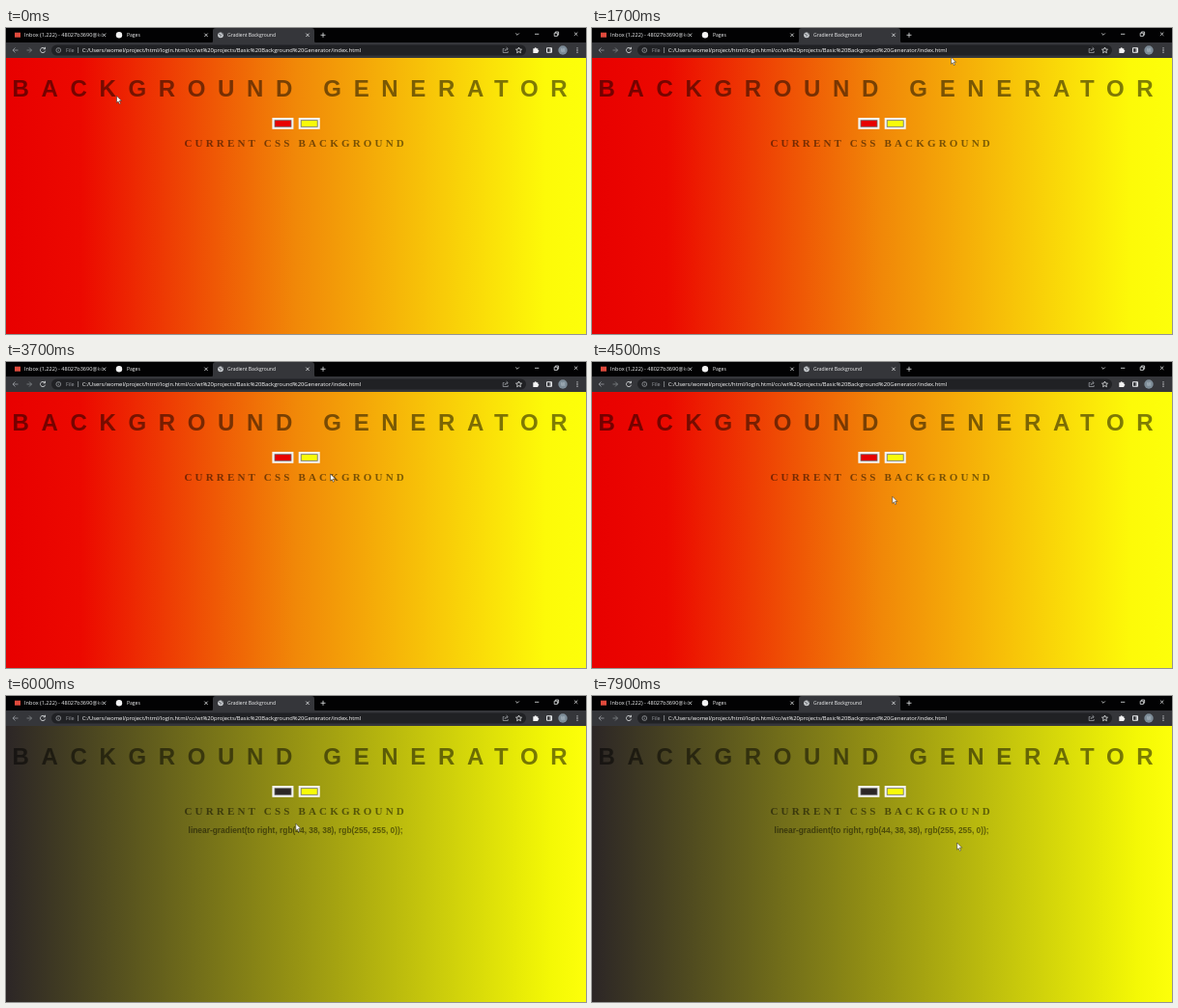
An HTML page that plays this animation: 600 by 317 pixels, repeating every 8000 ms.

```html
<!DOCTYPE html>
<html lang="en">
<head>
<meta charset="utf-8">
<title>Background generator</title>
<style>
  html, body { margin: 0; width: 100%; height: 100%; overflow: hidden; background: #000; }
  svg { display: block; width: 100%; height: 100%; }
  .ui { font-family: "Open Sans", "Noto Sans", sans-serif; font-size: 5.05px; fill: #f4f5f6; }
  .url { font-size: 5.83px; fill: #fff; }
  .dim { fill: #9a9da2; }
  .icon { fill: none; stroke: #e4e6e8; stroke-width: .8; }
  .page { fill: #000; fill-opacity: .5; font-weight: bold; }
  .title { font: bold 24px "Liberation Sans", Arial, sans-serif; letter-spacing: 12.65px; }
  .heading { font: bold 11px "Liberation Serif", "Times New Roman", serif; letter-spacing: 3.18px; }
  .css { font: bold 8.4px "Liberation Sans", Arial, sans-serif; }
</style>
</head>
<body>
<svg viewBox="0 0 600 317" preserveAspectRatio="none">
  <defs>
    <linearGradient id="warm">
      <stop offset="0" stop-color="#e80000"/>
      <stop offset=".13" stop-color="#ec0900"/>
      <stop offset=".5" stop-color="#f18808"/>
      <stop offset=".93" stop-color="#fdfa08"/>
      <stop offset="1" stop-color="#fdff0a"/>
    </linearGradient>
    <linearGradient id="dark">
      <stop offset="0" stop-color="#2c2626"/>
      <stop offset=".5" stop-color="#969313"/>
      <stop offset=".94" stop-color="#f4f805"/>
      <stop offset="1" stop-color="#fdff0a"/>
    </linearGradient>
    <linearGradient id="fade" gradientUnits="userSpaceOnUse" x1="92" x2="103" y1="0" y2="0">
      <stop offset="0" stop-color="#f4f5f6"/>
      <stop offset="1" stop-color="#f4f5f6" stop-opacity="0"/>
    </linearGradient>
    <path id="x" d="M-1.7-1.7l3.4 3.4M1.7-1.7l-3.4 3.4"/>
  </defs>

  <rect id="backdrop" y="31" width="600" height="286"/>

  <!-- tab strip -->
  <rect width="600" height="16" fill="#020203"/>
  <path d="M211 16q3 0 3-3V3q0-3 3-3h99q3 0 3 3v10q0 3 3 3z" fill="#35363a"/>
  <rect x="9" y="4.7" width="6" height="5" fill="#e04a3c"/>
  <circle cx="117" cy="7.3" r="3.2" fill="#f4f4f4"/>
  <circle cx="222" cy="7.3" r="2.9" fill="#c9ccd0"/>
  <path d="M220 6l2 1v2M223 5l1.2 1.5-1 1" stroke="#55585c" stroke-width=".8" fill="none"/>
  <g class="ui">
    <text x="19" y="9.3" style="font-size:5.6px;fill:url(#fade)">Inbox (1,222) - 48027b3690@ke</text>
    <text x="125" y="9.2">Pages</text>
    <text x="229" y="9.2">Gradient Background</text>
  </g>
  <g class="icon">
    <use href="#x" x="101.5" y="7.3"/>
    <use href="#x" x="207" y="7.3"/>
    <use href="#x" x="312" y="7.3"/>
    <path d="M325.5 7.3h5M328 4.8v5M527.2 5.5l1.8 1.8 1.8-1.8M547 6.3h4.3"/>
    <path d="M567.2 5.2h3.2v3.2h-3.2zM568.4 5.2V4h3.2v3.2h-1.2"/>
    <use href="#x" x="589.6" y="6.2"/>
  </g>

  <!-- toolbar -->
  <rect y="15" width="600" height="16" fill="#35363a"/>
  <rect x="47" y="17.5" width="491" height="11" rx="5.5" fill="#202124"/>
  <g class="icon">
    <g stroke="#9a9da2">
      <path d="M12.5 23h-5.5M9.5 20.5L7 23l2.5 2.5"/>
      <path d="M21.5 23h5M24 20.5l2.5 2.5-2.5 2.5" stroke="#85888c"/>
      <path d="M515.5 21.5h-1.3v4h5v-1.5M516 24q0-2.4 3-2.4M517.6 20l1.7 1.6-1.7 1.6"/>
    </g>
    <path d="M40 21.2A2.6 2.6 0 1 0 40.6 23.7M40.5 19.8v2h-2"/>
    <g stroke="#a5a8ad" stroke-width=".7">
      <circle cx="54.3" cy="23" r="2.4"/>
      <path d="M54.3 22.6v1.6M54.3 21.3v.6M74.6 20v6"/>
    </g>
    <path d="M530.5 20l.9 2 2.1.2-1.6 1.4.5 2.1-1.9-1.1-1.9 1.1.5-2.1-1.6-1.4 2.1-.2z"/>
    <path d="M559.5 20.7h5v4.6h-5zM563.2 20.7v4.6" stroke-width="1"/>
  </g>
  <path d="M545.3 21.2h1.4a1 1 0 0 1 2 0h1.6v1.6a1 1 0 0 1 0 2v1.2h-5z" fill="#f4f4f4"/>
  <circle cx="576" cy="23" r="4.7" fill="#7d8c97"/>
  <g fill="#e4e6e8">
    <circle cx="591" cy="20.8" r=".65"/><circle cx="591" cy="23" r=".65"/><circle cx="591" cy="25.2" r=".65"/>
  </g>
  <g class="ui">
    <text class="dim" x="62" y="25" style="font-size:5.4px">File</text>
    <text class="url" x="78.7" y="25">C:/Users/womel/project/html/login.html/cc/wt%20projects/Basic%20Background%20Generator/index.html</text>
    <text x="576" y="24.7" text-anchor="middle" style="font-size:4.5px;fill:#c3cfd9">W</text>
  </g>

  <!-- page -->
  <text class="page title" x="6.5" y="71">BACKGROUND GENERATOR</text>
  <g fill="#f4f4f4">
    <rect x="275.4" y="93" width="22" height="11.8"/>
    <rect x="302.7" y="93" width="22" height="11.8"/>
  </g>
  <g stroke="#6b6b6b" stroke-width=".8">
    <rect id="swatch" x="278" y="95.7" width="17" height="6.6"/>
    <rect x="305.2" y="95.7" width="17" height="6.6" fill="#f8fb08"/>
  </g>
  <text class="page heading" x="184.4" y="123">CURRENT CSS BACKGROUND</text>
  <text id="css" class="page css" x="188.6" y="142.3">linear-gradient(to right, rgb(44, 38, 38), rgb(255, 255, 0));</text>

  <path id="cursor" d="M0 0v7.2l1.6-1.5 1.2 2.7 1.2-.5-1.2-2.7h2.3z"
        fill="#fff" stroke="#222" stroke-width=".5"/>
</svg>
<script>
  const LOOP = 8000;
  const SWITCH_AT = 4900;
  const path = [ // time, x, y
    [0, 114.5, 70.3], [1700, 371.5, 30.2], [2900, 360.4, 92.4], [4500, 310.8, 139.3],
    [5200, 290.8, 154.3], [6800, 308.8, 110.3], [7900, 377.6, 152]
  ];
  const [backdrop, swatch, css, cursor] =
    ["backdrop", "swatch", "css", "cursor"].map(id => document.getElementById(id));

  const smooth = u => u * u * (3 - 2 * u);

  function cursorAt(t) {
    const next = path.findIndex(p => p[0] > t);
    if (next < 0) return path[path.length - 1].slice(1);
    const [t0, x0, y0] = path[next - 1];
    const [t1, x1, y1] = path[next];
    const u = smooth((t - t0) / (t1 - t0));
    return [x0 + (x1 - x0) * u, y0 + (y1 - y0) * u];
  }

  function draw(t) {
    const picked = t >= SWITCH_AT;
    backdrop.setAttribute("fill", picked ? "url(#dark)" : "url(#warm)");
    swatch.setAttribute("fill", picked ? "#2c2626" : "#e80000");
    css.setAttribute("visibility", picked ? "visible" : "hidden");
    cursor.setAttribute("transform", `translate(${cursorAt(t)})`);
  }

  const start = performance.now();
  function tick() {
    draw((performance.now() - start) % LOOP);
    requestAnimationFrame(tick);
  }
  tick();
</script>
</body>
</html>
```
